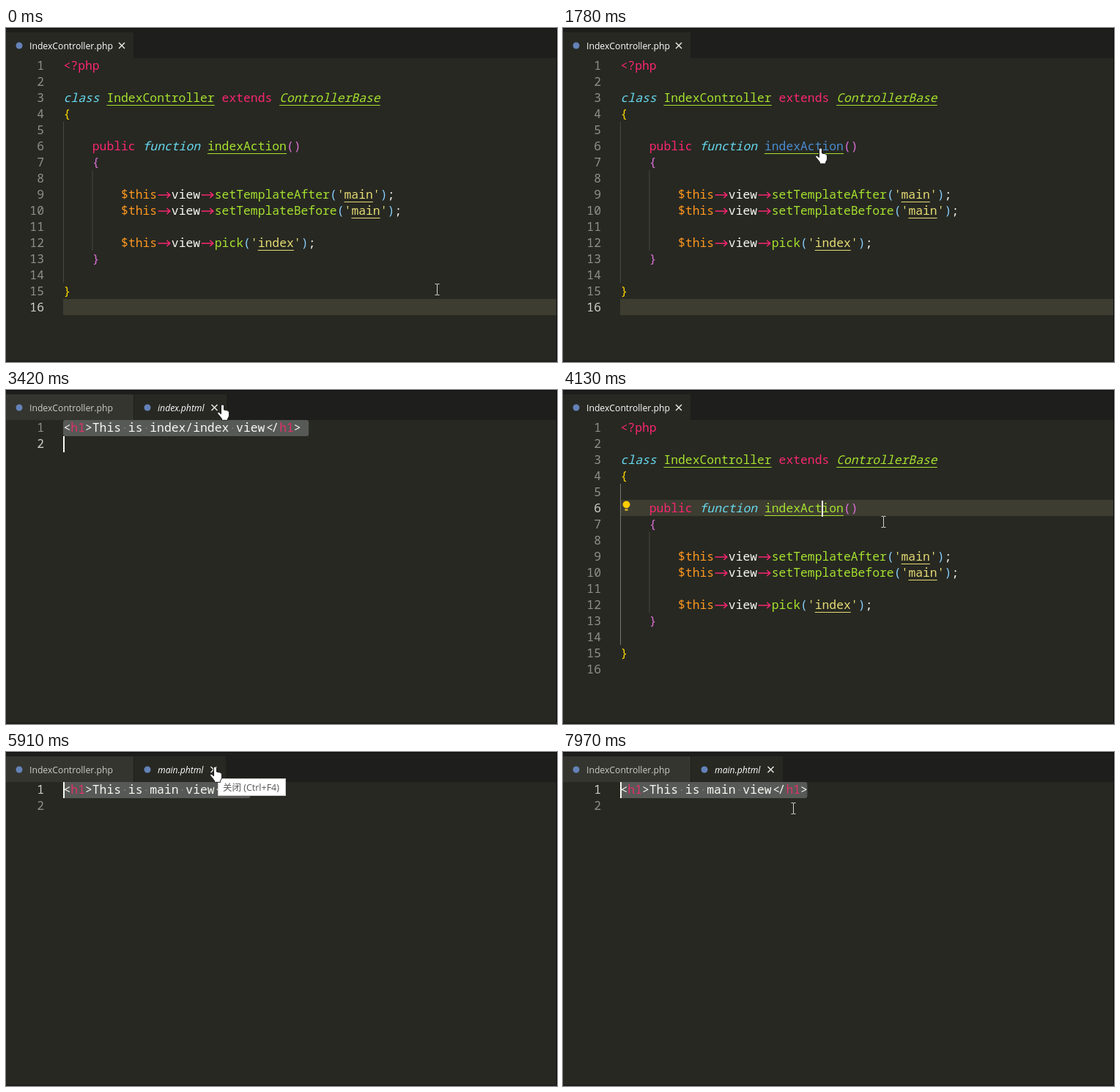
These frames come from a looping animation (752 px wide and 456 px high, 8000 ms). An HTML page:

```html
<!DOCTYPE html>
<html lang="en">
<head>
<meta charset="utf-8">
<title>Editor: jump to view</title>
<style>
html, body { margin: 0; width: 100%; height: 100%; overflow: hidden; background: #272822; }
svg { display: block; }
text { white-space: pre; font: 16.37px "Noto Sans Mono", monospace; }
.tab { font: 12.2px "Open Sans", sans-serif; }
.tip { font: 12.5px "Open Sans", "Noto Sans CJK SC", sans-serif; }
.it { font-style: italic; }
</style>
</head>
<body>
<svg width="752" height="456" viewBox="0 0 752 456">
  <rect width="752" height="456" fill="#272822"/>
  <g id="scene"></g>
  <rect id="caret" width="2" height="22" fill="#f8f8f0"/>
  <g id="tip">
    <rect x="289.5" y="36.5" width="92" height="23" fill="#fff" stroke="#c8c8c8"/>
    <text class="tip" x="296" y="52.5" fill="#575757">关闭 (Ctrl+F4)</text>
  </g>
  <path d="M0 .5H751.5V456" fill="none" stroke="#0a0a0a"/>
  <rect y="454" width="752" height="2" fill="#1e1f1c"/>
  <path id="mouse"/>
</svg>
<script>
const LOOP = 8000, BLINK = 500, LEFT = 78.5, CELL = 9.822, ROW = 22;
const $ = id => document.getElementById(id);
const colX = c => LEFT + c * CELL;
const midY = n => 51 + (n - 1) * ROW;

// In source rows "~k" starts a token of style k; capitals are underlined.
const colors = {
  w: '#f8f8f2', p: '#f92672', c: '#66d9ef', g: '#a6e22e', o: '#da70d6',
  y: '#e6db74', b: '#87cefa', a: '#fd971f', k: '#ffd700', i: '#a6e22e'
};
const call = (name, arg) =>
  `w        ~a$this~>->~wview~>->~g${name}~b(~y'~Y${arg}~y'~b)~w;`;
const php = [
  'p<?php', '', 'cclass~w ~GIndexController~w ~pextends~w ~IControllerBase', 'k{', '',
  'w    ~ppublic~w ~cfunction~w ~GindexAction~o()', 'w    ~o{', '',
  call('setTemplateAfter', 'main'), call('setTemplateBefore', 'main'), '',
  call('pick', 'index'), 'w    ~o}', '', 'k}', ''
];
const caretCol = { 6: 28, 9: 40, 10: 42 };

// Blink is the moment the caret last became solid.
const scenes = [
  { t: 0, line: 16 },
  { t: 1640, line: 16, link: 6 },
  { t: 2100, line: 6, link: 6, blink: 2100 },
  { t: 2200, line: 6, link: 6, blink: 2100, tab: 'index' },
  { t: 2240, view: 'index/index', tab: 'index', line: 2, blink: 2240 },
  { t: 3660, line: 6, blink: 3660, bulb: true },
  { t: 4250, line: 6, blink: 3660, bulb: true, link: 9 },
  { t: 4660, line: 9, blink: 4660, bulb: true, link: 9 },
  { t: 4710, line: 9, blink: 4660, bulb: true, link: 9, tab: 'main' },
  { t: 4780, view: 'main', tab: 'main', line: 1, blink: 4780 },
  { t: 6550, line: 9, blink: 6550 },
  { t: 7280, line: 9, blink: 6550, link: 10 },
  { t: 7480, line: 10, blink: 7480, link: 10 },
  { t: 7540, line: 10, blink: 7480, link: 10, tab: 'main' },
  { t: 7600, view: 'main', tab: 'main', line: 1, blink: 7600 }
];

const track = [
  [470, 588, 357], [780, 368, 292], [1010, 425, 198], [1270, 474, 253], [1310, 474, 253],
  [1780, 351, 164], [2720, 351, 164], [3420, 295, 20], [3660, 295, 20], [4360, 485, 234],
  [4790, 485, 234], [5340, 314, 53], [5500, 277, 24], [5630, 285, 20], [6550, 285, 20],
  [7030, 506, 260], [7270, 492, 253], [7610, 492, 253], [7970, 314, 77]
];

const pointers = {
  beam: 'M-3-7.5h2.5l.5.5.5-.5H3M0-7V7M-3 7.5h2.5L0 7l.5.5H3',
  hand: 'M-2 1.5Q-2 0 0 0T2 1.5V7l4 .8q3 .6 3 3v4q0 2-2 4.5v2h-8v-2l-5.5-7q-1-1.5 .5-2t3 1.5l1 1.2z',
  arrow: 'M0 0V16l4-4 3 6 2-1-3-6h5z'
};

const rect = (x, y, w, h, fill, more = '') =>
  `<rect x="${x}" y="${y}" width="${w}" height="${h}" fill="${fill}" ${more}/>`;
const text = (x, y, s, fill, more = '') =>
  `<text x="${x}" y="${y}" fill="${fill}" ${more}>${s.replace(/</g, '&lt;')}</text>`;
const line = (d, stroke, w = 1) =>
  `<path d="${d}" fill="none" stroke="${stroke}" stroke-width="${w}"/>`;
const code = (col, n, s, fill, more) => text(colX(col), midY(n) + 6, s, fill, more);

function drawTab(x, w, title, active, closeX, italic) {
  return rect(x, 6, w, 35, active ? '#272822' : '#34352f') +
    `<circle cx="${x + 18}" cy="24" r="4.5" fill="#6482b8"/>` +
    text(x + 32, 28.5, title, active ? '#fff' : '#ccccc7', `class="tab${italic ? ' it' : ''}"`) +
    (active ? line(`M${closeX - 4} 20l8 8m0-8l-8 8`, '#f0f0ec', 1.4) : '');
}

function drawTabs({ tab }) {
  let out = rect(0, 0, 752, 41, '#1e1f1c') +
    drawTab(0, 174, 'IndexController.php', !tab, 158);
  if (tab) {
    const extra = tab === 'index' ? 1 : 0;
    out += drawTab(175, 125 + extra, tab + '.phtml', true, 283.5 + extra, true);
  }
  return out;
}

const drawNumbers = (count, current) => Array.from({ length: count }, (_, i) =>
  text(52, midY(i + 1) + 6, `${i + 1}`, i + 1 === current ? '#d0d0cb' : '#90908a',
    'text-anchor="end"')).join('');

function drawRow(row, n, s) {
  let col = 0, out = '';
  for (const token of row ? row.split('~') : []) {
    const key = token[0], low = key.toLowerCase(), word = token.slice(1);
    const x = colX(col), y = midY(n), end = x + word.length * CELL;
    if (key === '>') {
      out += line(`M${x + 1.5} ${y + 1}H${end - 2}m-4.5-4l4.5 4-4.5 4`, colors.p, 1.5);
    } else if (word.trim()) {
      const linked = s.link === n && key !== low;
      out += code(col, n, word, linked ? '#4a8bd0' : colors[low],
        'ci'.includes(low) ? 'class="it"' : '');
      if (key !== low && !(linked && s.tab)) {
        out += line(`M${x} ${y + 10.5}H${end}`, colors[low]);
      }
    }
    col += word.length;
  }
  return out;
}

function drawPhp(s) {
  const inCall = s.line === 9 || s.line === 10;
  const guide = (x, from, to, on) =>
    line(`M${x} ${midY(from) - 11}V${midY(to) + 11}`, on ? '#767771' : '#464741');
  let out = rect(78, midY(s.line) - 11, 673, 22, '#3e3d32') +
    guide(78.5, 5, 14, s.line === 6) + guide(118, 8, 12, inCall) +
    drawNumbers(16, s.line);
  if (inCall) {
    for (const col of [37, 44]) {
      out += rect(colX(col + s.line - 9) + .5, midY(s.line) - 10.5, CELL - .5, 21, 'none',
        'stroke="#80827a"');
    }
  }
  if (s.bulb) {
    out += '<path d="M84.5 161q-3-2-3-4.500a5 5 0 0 1 10 0q0 2.500-3 4.500z" fill="#fc0"/>' +
      rect(84.5, 162, 4, 3, '#c9a52a');
  }
  return out + php.map((row, i) => drawRow(row, i + 1, s)).join('');
}

function drawView(s) {
  const body = `This is ${s.view} view`, end = 4 + body.length;
  const width = (end + 5) * CELL + (s.line === 2 ? 11 : 0);
  let out = rect(78, 41, width, 22, '#575956', 'rx="3"') + drawNumbers(2, s.line);
  [...body].forEach((ch, i) => {
    if (ch === ' ') out += `<circle cx="${colX(4.5 + i)}" cy="52" r="1" fill="#7c7d77"/>`;
  });
  const { w } = colors, tag = '#e2306a';
  return out + code(0, 1, '<', w) + code(1, 1, 'h1', tag) + code(3, 1, '>' + body, w) +
    code(end + .15, 1, '<', w) + code(end + .9, 1, '/', w) +
    code(end + 2, 1, 'h1', tag) + code(end + 4, 1, '>', w);
}

function mouseAt(t) {
  const i = track.findIndex(k => k[0] > t);
  if (i <= 0) return (i ? track.at(-1) : track[0]).slice(1);
  const [t0, x0, y0] = track[i - 1], [t1, x1, y1] = track[i];
  const u = (t - t0) / (t1 - t0), e = u * u * (3 - 2 * u);
  return [x0 + (x1 - x0) * e, y0 + (y1 - y0) * e];
}

function pointerFor(s, x, y) {
  if (y < 41) return x < 174 || (s.tab && x < 301) ? 'hand' : 'arrow';
  return s.link && !s.tab ? 'hand' : 'beam';
}

let shown;
function frame(now) {
  const t = now % LOOP;
  const s = scenes.findLast(k => k.t <= t);
  if (s !== shown) {
    shown = s;
    $('scene').innerHTML = (s.view ? drawView(s) : drawPhp(s)) + drawTabs(s);
    $('caret').setAttribute('x', s.view ? 78 : Math.floor(colX(caretCol[s.line] || 0)));
    $('caret').setAttribute('y', midY(s.line) - 10);
  }
  const solid = s.blink && Math.floor((t - s.blink) / BLINK) % 2 === 0;
  $('caret').style.display = solid ? '' : 'none';
  $('tip').style.display = t >= 5905 && t < 6470 ? '' : 'none';

  const [x, y] = mouseAt(t).map(Math.round), kind = pointerFor(s, x, y), beam = kind === 'beam';
  const attrs = {
    d: pointers[kind], transform: `translate(${x + .5} ${y})`,
    fill: beam ? 'none' : '#fff', stroke: beam ? '#d4d4d0' : '#1a1a1a'
  };
  for (const name in attrs) $('mouse').setAttribute(name, attrs[name]);
  requestAnimationFrame(frame);
}
const start = performance.now();
const tick = frame;
frame = now => tick(Math.max(0, now - start));
requestAnimationFrame(frame);
</script>
</body>
</html>
```
